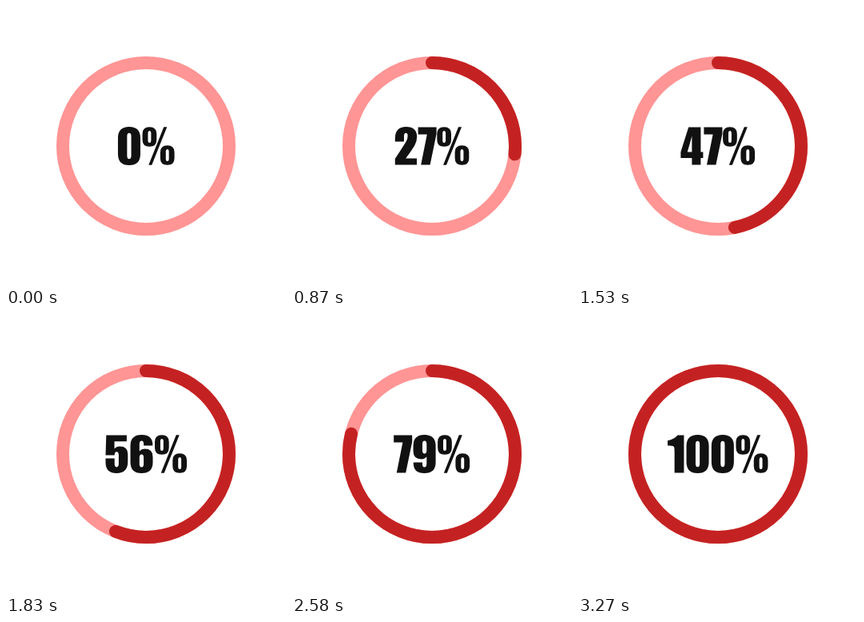
Recreate the animation shown at these times as an HTML page. Size 350 px wide and 350 px high, loop 3600 ms.

```html
<!DOCTYPE html>
<html lang="en">
<head>
<meta charset="utf-8">
<title>Progress ring</title>
<style>
  html, body { margin: 0; width: 100%; height: 100%; overflow: hidden; background: #fff; }
  svg { display: block; width: 100vw; height: 100vh; }
  circle { fill: none; stroke-width: 16; }
</style>
</head>
<body>
<svg viewBox="0 0 350 350" role="img">
  <circle cx="175" cy="175" r="104" stroke="#ff9595"/>
  <circle id="arc" cx="175" cy="175" r="104" stroke="#c42222" stroke-linecap="round"
    pathLength="100" transform="rotate(-90 175 175)"/>
  <g id="label" fill="#111" fill-rule="evenodd"></g>
</svg>
<script>
const LOOP = 3600, STEP = 30, STEPS = 109;
const TOP = 151;
const svg = document.querySelector('svg');
const arc = document.getElementById('arc');
const label = document.getElementById('label');

// Upright oval with straight sides; r is the height of its rounded ends.
function slot(x0, y0, x1, y1, r) {
  const cx = (x0 + x1) / 2;
  return `M${cx} ${y0}Q${x1} ${y0} ${x1} ${y0 + r}V${y1 - r}Q${x1} ${y1} ${cx} ${y1}` +
    `Q${x0} ${y1} ${x0} ${y1 - r}V${y0 + r}Q${x0} ${y0} ${cx} ${y0}Z`;
}

const six = 'M29.4 13.6H18.2V11.5Q18.2 7.6 15.8 7.6Q12.9 7.6 12.9 11.8V20.4' +
  'Q15.4 17.6 19.4 17.6Q29.6 17.6 29.6 27.5V34.5Q29.6 48 15.6 48' +
  'Q1.6 48 1.6 34V13.5Q1.6 0 15.8 0Q29.4 0 29.4 12.5Z' + slot(12.9, 24.4, 18.2, 40.4, 4);

// Heavy condensed lettering: advance width, outline, optional turn.
const glyphs = {
  0: { w: 31.3, d: slot(1.6, 0, 29.6, 48, 14) + slot(13, 7.8, 18.2, 40.2, 4.2) },
  1: { w: 22.5, d: 'M21 .6V47.4H9.2V21.8Q9.2 16.5 8.6 15.2Q7.8 13.6 3 13.6H.6V7.2Q8.8 6 13 .6Z' },
  2: { w: 29.6, d: 'M28.4 47.4H1.2V40Q14.5 20 16 16.6Q17 14 17 11Q17 7.8 14.6 7.8' +
    'Q12.4 7.8 12.4 12V18.4H1.2V14.8Q1.2 0 15 0Q28.6 0 28.6 12.6' +
    'Q28.6 18.5 25.6 23.4Q21 31 14.6 39.4H28.4Z' },
  3: { w: 30.8, d: 'M1.3 16.8V13Q1.3 0 15 0Q28.8 0 28.8 12.4V14Q28.8 20.4 24 22.3' +
    'Q29.3 24.2 29.3 30.5V34.5Q29.3 48 15.3 48Q1.3 48 1.3 34.5V30H12.6V36' +
    'Q12.6 40.4 15.2 40.4Q17.8 40.4 17.8 36V31.5Q17.8 27.4 16.4 26.6' +
    'Q15 25.8 10.8 25.8V19.4Q15.4 19.4 16.5 18.5Q17.5 17.6 17.5 14.8V12' +
    'Q17.5 7.6 15.2 7.6Q12.6 7.6 12.6 11.5V16.8Z' },
  4: { w: 29.2, d: 'M25.6 .6V31.4H28.6V39H25.6V47.4H14.6V39H.6V31.4L10.4 .6ZM14.6 31.4V11.5L9 31.4Z' },
  5: { w: 31, d: 'M28 .6V8.2H12.6V17.6Q15 14.6 19.4 14.6Q29.4 14.6 29.4 24.5V33.5' +
    'Q29.4 48 15.4 48Q1.6 48 1.6 34.5V29.6H12.8V36Q12.8 40.4 15.4 40.4' +
    'Q18 40.4 18 36V25.6Q18 21.2 15.4 21.2Q12.8 21.2 12.8 25.6H1.6L2.4 .6Z' },
  6: { w: 31.2, d: six },
  7: { w: 23.2, d: 'M23.4 .6V8.8L15.4 47.4H4L11.6 9.6H.4V.6Z' },
  8: { w: 30.9, d: 'M15.4 0Q29 0 29 12.2V14.2Q29 20.6 25 22.7Q29.6 25 29.6 31.4V34.8' +
    'Q29.6 48 15.4 48Q1.4 48 1.4 34.8V31.4Q1.4 25 6 22.7Q1.9 20.6 1.9 14.2V12.2Q1.9 0 15.4 0Z' +
    slot(12.9, 7.6, 18, 19.6, 4) + slot(12.9, 26.4, 18, 40.4, 4) },
  9: { w: 31.2, d: six, turn: 'rotate(180 15.6 24)' },
  '%': { w: 42, d: slot(.9, .2, 18.6, 24.8, 8.5) + slot(7.8, 5, 11.7, 20, 2.5) +
    slot(23.2, 23.2, 40.9, 47.8, 8.5) + slot(30.1, 28, 34, 43, 2.5) + 'M27.6 .2H31.6L12.6 47.8H8.6Z' }
};

function write(text) {
  const set = [...text].map(c => glyphs[c]);
  let x = 175 - set.reduce((sum, g) => sum + g.w, 0) / 2;
  label.innerHTML = set.map(g => {
    const path = `<path d="${g.d}" transform="translate(${x} ${TOP}) ${g.turn || ''}"/>`;
    x += g.w;
    return path;
  }).join('');
  svg.setAttribute('aria-label', text);
}

let shown = -1;
function draw(time) {
  const step = Math.min(STEPS, Math.floor(time % LOOP / STEP));
  if (step === shown) return;
  shown = step;
  const percent = step / STEPS * 100;
  arc.style.display = step ? '' : 'none';
  arc.setAttribute('stroke-dasharray', `${percent} 200`);
  write(Math.round(percent) + '%');
}

const start = performance.now();
function tick() {
  draw(performance.now() - start);
  requestAnimationFrame(tick);
}
tick();
</script>
</body>
</html>
```
